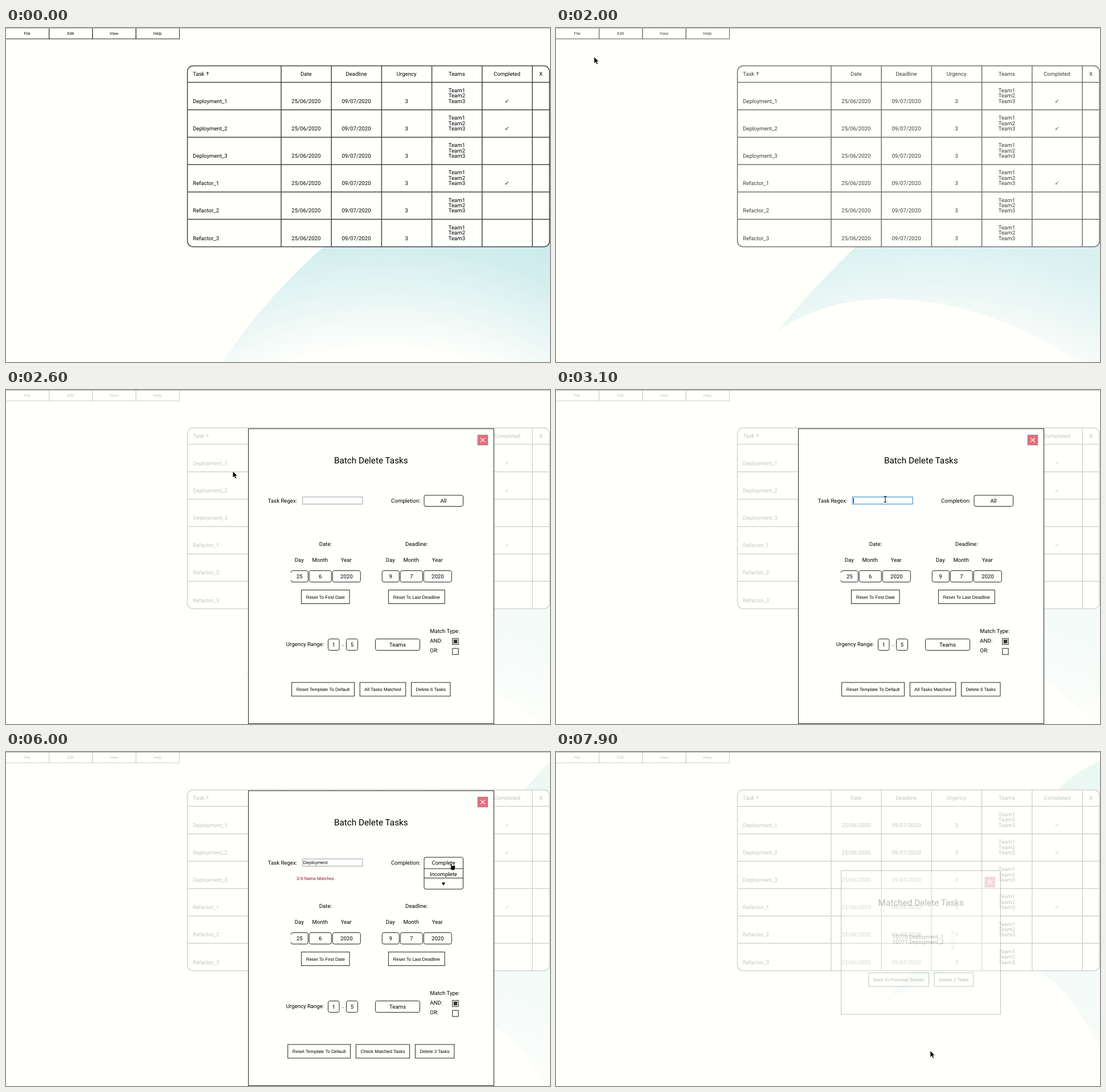
Write an HTML page that moves like this. It is 955 px wide and 587 px high and loops after 8 s.

```html
<!DOCTYPE html>
<html lang="en">
<head>
<meta charset="utf-8">
<title>Batch delete tasks</title>
<style>
html, body { margin: 0; width: 100%; height: 100%; overflow: hidden; background: #fffffc; }
svg { display: block; position: fixed; left: 0; top: 0; }
text { font: 9.6px Roboto, sans-serif; fill: #000; text-rendering: geometricPrecision; white-space: pre; }
.mid { text-anchor: middle; }
.menu { font-size: 7.04px; }
.title { font-size: 15.3px; }
.btn { font: 8px "Liberation Sans", Arial, sans-serif; }
.note { font-size: 7.68px; fill: #a00c3a; }
.tick { font: 9.6px "DejaVu Sans", sans-serif; }
.box { fill: #fffffc; stroke: #222; }
.grid { fill: none; stroke: #444; stroke-width: 1.5; }
.hot rect { fill: #a9dce0; }
.hot text { fill: #fff; }
</style>
</head>
<body>
<svg id="stage" width="955" height="587" viewBox="0 0 955 587"></svg>
<script>
const $ = id => document.getElementById(id);
const pen = document.createElement('canvas').getContext('2d');
pen.font = '80px "Liberation Sans", Arial, sans-serif';
const widthOf = s => pen.measureText(s).width / 10;

const text = (x, y, s, cls = '', id = '') => `<text x="${x}" y="${y}" class="${cls}" id="${id}">${s}</text>`;
const mid = (x, y, s, cls = '', id = '') => text(x, y, s, 'mid ' + cls, id);
const rect = (x, y, w, h, r = 0, more = 'class="box"') =>
  `<rect x="${x}" y="${y}" width="${w}" height="${h}" rx="${r}" ${more}/>`;
const path = (d, more = '') => `<path d="${d}" ${more}/>`;
const group = (id, body) => `<g id="${id}">${body}</g>`;
const field = (x, w, s, y) => rect(x, y, w, 20, 3) + mid(x + w / 2, y + 13.2, s);
const close = (x, y) => rect(x, y, 17.5, 17.5, 0, 'fill="#ea6a78" stroke="#888"') +
  path(`M${x + 4.7} ${y + 4.7}l8 8m0-8l-8 8`, 'stroke="#fff" stroke-width="1.3"');

// A centred row of buttons, each as wide as its label plus padding.
function buttons(centre, y, ...labels) {
  const gap = 9.8, widths = labels.map(s => widthOf(s) + 16);
  let x = centre - (widths.reduce((a, b) => a + b) + gap * (labels.length - 1)) / 2;
  return labels.map((s, i) => {
    const out = rect(x, y, widths[i], 24) + mid(x + widths[i] / 2, y + 15, s, 'btn');
    x += widths[i] + gap;
    return out;
  }).join('');
}

function menu() {
  const item = (id, x, y, s) => group(id, rect(x, y, 76.2, 18.6) + mid(x + 37.7, y + 11.5, s, 'menu'));
  return ['File', 'Edit', 'View', 'Help'].map((s, i) => item('menu' + i, 76.25 * i - .5, .5, s)).join('') +
    group('drop', ['New Tasks', 'Delete Tasks'].map((s, i) => item('drop' + i, -.5, 19.1 + 18.6 * i, s)).join(''));
}

function table() {
  const colX = i => 483 + 88.2 * i, rowY = i => 95.6 + 48.15 * i;
  let out = rect(318.5, 66.5, 635.7, 318, 10, 'class="grid" style="fill:#fffffc"') +
    text(328, 83.5, 'Task') + path('M353.8 83.2v-5.6m-2.5 2.5l2.5-2.5l2.5 2.5', 'fill="none" stroke="#000" stroke-width=".9"') +
    mid(939, 83.5, 'X');
  ['Date', 'Deadline', 'Urgency', 'Teams', 'Completed', ''].forEach((s, i) =>
    out += path(`M${colX(i)} 66.5V384.5`, 'class="grid"') + mid(colX(i) + 43.8, 83.5, s));
  for (let i = 0; i < 6; i++) {
    const y = rowY(i) + 36.2;
    const cell = (col, s, up = 0, cls = '') => mid(colX(col) + 43.8, y - up, s, cls);
    out += path(`M318.5 ${rowY(i)}H954`, 'class="grid"') +
      text(328, y, (i < 3 ? 'Deployment_' : 'Refactor_') + (i % 3 + 1)) +
      cell(0, '25/06/2020') + cell(1, '09/07/2020') + cell(2, '3') +
      [1, 2, 3].map(n => cell(3, 'Team' + n, 9.4 * (3 - n))).join('') +
      ([0, 1, 3].includes(i) ? cell(4, '✓', 0, 'tick') : '');
  }
  return out;
}

function dates(x, label, day, month, reset) {
  const part = (dx, w, name, value) => mid(x + dx + w / 2 - .6, 302.4, name) + field(x + dx, w, value, 317.5);
  return mid(x + 60.5, 274.3, label) + part(0, 30, 'Day', day) + part(32, 39, 'Month', month) +
    part(73, 49, 'Year', 2020) + buttons(x + 60.5, 351.5, reset);
}

function batch() {
  const check = y => rect(783.7, y, 10.5, 10.6, 0, 'fill="#fff" stroke="#666" stroke-width="1.5"');
  const actions = (id, check, n) =>
    group(id, buttons(640.8, 514, 'Reset Template To Default', check, `Delete ${n} Tasks`));
  return rect(425.5, 68, 431, 518.5) + close(828.2, 79.2) +
    mid(640.8, 129, 'Batch Delete Tasks', 'title') +
    text(459.8, 197.5, 'Task Regex:') + rect(520.5, 188, 105.5, 12.5, 0, 'id="input" fill="#fff"') +
    text(521.8, 197.3, '', 'btn', 'typed') + path('M522.5 190v9', 'id="caret" stroke="#000"') +
    text(510, 225, '3/6 Name Matches', 'note', 'note') +
    text(676, 197.5, 'Completion:') + rect(734, 185, 68.5, 19.5, 3, 'class="box" id="select"') +
    group('list', path('M734 205h68.5m-68.5 16.5h68.5', 'stroke="#222"') +
      mid(768, 218, 'Incomplete') + path('M765 229.2h6l-3 5.6z')) +
    mid(768, 198, '', '', 'choice') +
    dates(500.3, 'Date:', 25, 6, 'Reset To First Date') +
    path('M500.3 321v13', 'stroke="#fffffc" stroke-width="2"') +
    dates(660.3, 'Deadline:', 9, 7, 'Reset To Last Deadline') +
    text(491.8, 450.4, 'Urgency Range:') + field(565.5, 19.5, 1, 437.5) + text(589, 450.4, '..') +
    field(597.5, 20, 5, 437.5) + field(648.5, 78, 'Teams', 437.5) +
    ['Match Type:', 'AND:', 'OR:'].map((s, i) => text(744.3, 426.6 + 17.2 * i, s)).join('') +
    check(436.7) + check(454.2) + rect(785.8, 438.8, 6.4, 6.4, 0, 'fill="#333"') +
    actions('all', 'All Tasks Matched', 6) + actions('some3', 'Check Matched Tasks', 3) +
    actions('some2', 'Check Matched Tasks', 2);
}

function matched() {
  return rect(500.5, 208.5, 280, 252.5) + close(753, 220) +
    mid(640.8, 269.7, 'Matched Delete Tasks', 'title') +
    text(590.6, 328, '10770 Deployment_1') + text(590.6, 337.4, '10771 Deployment_2') +
    rect(692, 313, 8, 34, 0, 'fill="#eef0ee"') +
    path('M694.5 318h3l-1.5-2zm0 24.5h3l-1.5 2z', 'fill="#666"') +
    buttons(640.8, 388, 'Back To Previous Screen', 'Delete 2 Tasks');
}

const shapes = {
  arrow: path('M0 0V11.5L2.7 9L4.6 13.2L6.6 12.3L4.7 8.2H8.2Z', 'stroke="#fff" stroke-width=".6"'),
  hand: path('M-2.4 1Q-1.6 0-.6 .8L1 4L5.6 3.2L6.4 4.6V8L5.4 11.5H.2L-3 7.2L-.4 7.2Z', 'stroke="#fff" stroke-width=".5"'),
  beam: path('M-2.5-5H2.5M0-5V5M-2.5 5H2.5', 'fill="none" stroke="#000"')
};

const stop = (o, color, a) => `<stop offset="${o}" stop-color="${color}" stop-opacity="${a}"/>`;
$('stage').innerHTML = '<radialGradient id="tint" gradientUnits="userSpaceOnUse" cx="660" cy="1100" r="1120">' +
  stop(.48, '#a6dce0', 0) + stop(.64, '#a6dce0', .5) + stop(1, '#a8dfd8', 1) + '</radialGradient>' +
  group('page', path('', 'id="swoosh" fill="url(#tint)"') + table() + menu()) +
  path('M0 .5H955', 'stroke="#b4b4b4"') +
  group('batch', batch()) + group('matched', matched()) +
  group('cursor', Object.keys(shapes).map(k => group(k, shapes[k])).join(''));

const ramp = (t, from, to) => Math.max(0, Math.min(1, (t - from) / (to - from)));
const smooth = u => u * u * (3 - 2 * u);
const show = (id, on) => $(id).style.display = on ? '' : 'none';
const fade = (id, v) => { $(id).style.opacity = v; show(id, v > 0); };
const shift = (id, x, y) => $(id).setAttribute('transform', `translate(${x} ${y})`);

// The wide sail narrows into a dome at the right, which then sways once.
function swoosh(t) {
  const k = ramp(t, 0, 4500), q = k * k, rest = (1 - k) ** 4;
  const sway = Math.sin(Math.PI * ramp(t, 4500, 7900));
  const x = 372 + 190 * k * q, y = 600 - 150 * k;
  const upper = `${x + 118 + 80 * k} ${y - 190} ${710 + 150 * q + 40 * sway} ${235 - 230 * q + 55 * sway}`;
  const lower = `${880 - 100 * Math.sin(Math.PI * k) + 50 * k} ${450 + 230 * rest + 90 * sway} ` +
    `${500 + 360 * k * q} ${620 - 370 * k ** .8 + 130 * sway}`;
  return `M${x} ${y}C${upper} 1000 ${120 - 112 * q - 33 * sway}V${640 + 120 * rest + 60 * sway}C${lower} ${x} ${y}Z`;
}

// Each move: start, end, goal x and y, sideways bulge on the way.
const moves = [
  [300, 900, 53, 15, 0, 0], [1400, 1700, 48, 45, 0, 0], [1900, 2200, 121, 67, 0, 0],
  [2200, 2900, 578, 192, 0, 0], [5400, 5800, 782, 196, 0, 50], [6400, 7300, 657, 525, 110, 60]
];
function pointer(t) {
  let x = 150, y = 110;
  for (const [from, to, gx, gy, bx, by] of moves) {
    const u = smooth(ramp(t, from, to)), arc = Math.sin(Math.PI * u);
    x += (gx - x) * u + bx * arc;
    y += (gy - y) * u + by * arc;
  }
  return [x, y];
}

function draw(t) {
  $('swoosh').setAttribute('d', swoosh(t));
  const opening = ramp(t, 2000, 2550);
  fade('page', 1 - .77 * (1 - (1 - ramp(t, 1900, 2500)) ** 2));
  fade('batch', opening - ramp(t, 7400, 7700));
  fade('matched', ramp(t, 7600, 8700));
  shift('batch', 0, 11 * (1 - opening));

  const [x, y] = pointer(t);
  const within = (l, top, r, b) => x >= l && x <= r && y >= top && y <= b;
  const open = t >= 800 && t < 1900;
  const press = open || t > 5700 && within(734, 185, 803, 205) || t < 7600 && within(615, 514, 708, 538);
  const look = press ? 'hand' : within(520, 188, 627, 201) ? 'beam' : 'arrow';
  show('cursor', t >= 300);
  shift('cursor', x, y);
  Object.keys(shapes).forEach(k => show(k, k === look));

  show('drop', open);
  ['menu0', 'drop0', 'drop1'].forEach((id, i) =>
    $(id).classList.toggle('hot', open && Math.floor(y / 19) === i));

  const typed = 'Deployment'.slice(0, Math.max(0, (t - 3800) / 100));
  const focus = t >= 3000 && t < 5800;
  $('typed').textContent = typed;
  $('input').setAttribute('stroke', focus ? '#5b9fd2' : '#a0a0a0');
  $('input').setAttribute('stroke-width', focus ? 1.4 : 1);
  shift('caret', widthOf(typed), 0);
  show('caret', focus);
  show('note', typed);

  const list = t >= 5800 && t < 6400;
  show('list', list);
  $('select').setAttribute('height', list ? 56 : 19.5);
  $('choice').textContent = t < 5800 ? 'All' : 'Complete';
  show('all', !typed);
  show('some3', typed && t < 6400);
  show('some2', t >= 6400);
}

function tick(now) {
  draw(Math.floor(now % 8000 / 100) * 100);
  requestAnimationFrame(tick);
}
draw(0);
requestAnimationFrame(tick);
</script>
</body>
</html>
```
